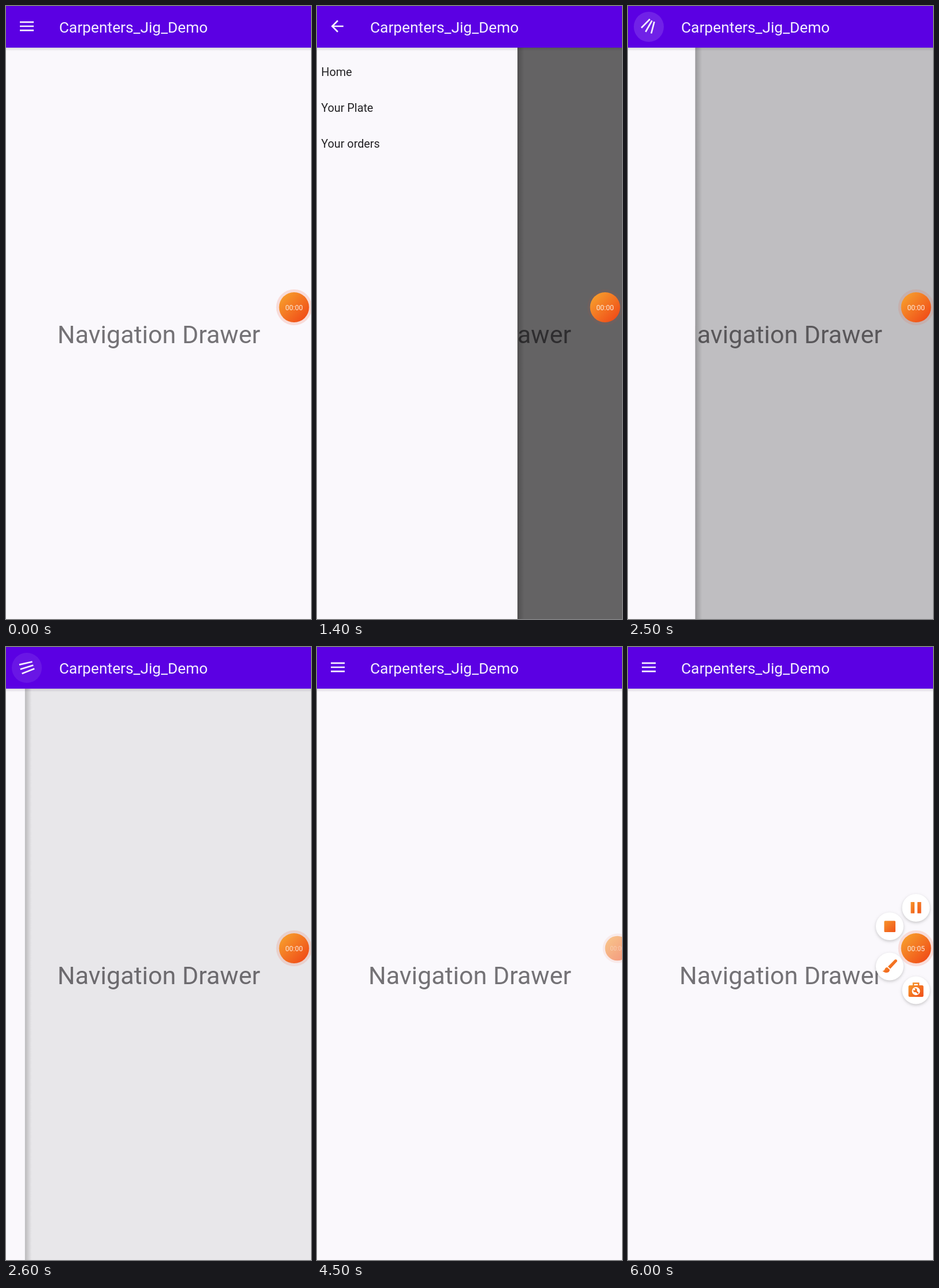
Animation of 528x1060 px, one loop 6100 ms. Source, as an HTML page with a canvas:

```html
<!DOCTYPE html>
<html lang="en">
<head>
<meta charset="utf-8">
<title>Navigation drawer</title>
<style>
  html, body { margin: 0; width: 100%; height: 100%; overflow: hidden; background: #faf8fc; }
  canvas { display: block; }
</style>
</head>
<body>
<canvas id="stage" width="528" height="1060"></canvas>
<script>
const ctx = document.getElementById('stage').getContext('2d');
const W = 528, H = 1060, BAR = 72, DRAWER = 347, LOOP = 6100, STEP = 100;
const DP = 4 / 3;
const PAPER = '#faf8fc';

const clamp = x => Math.max(0, Math.min(1, x));
const lerp = (a, b, p) => a + (b - a) * p;
const span = (t, a, b) => clamp((t - a) / (b - a));
const easeOut = (x, n) => 1 - Math.pow(1 - x, n);
const smooth = x => x * x * (3 - 2 * x);

function text(str, x, y, size, color, align = 'left') {
  ctx.font = `${size}px Roboto, "Noto Sans", sans-serif`;
  ctx.textAlign = align;
  ctx.fillStyle = color;
  ctx.fillText(str, x, y);
}

function disc(x, y, r, fill) {
  ctx.fillStyle = fill;
  ctx.beginPath();
  ctx.arc(x, y, r, 0, Math.PI * 2);
  ctx.fill();
}

function box(x, y, w, h, r = 0) {
  ctx.beginPath();
  ctx.roundRect(x, y, w, h, r);
  ctx.fill();
}

function fade(x0, y0, x1, y1, from, to) {
  const g = ctx.createLinearGradient(x0, y0, x1, y1);
  g.addColorStop(0, from);
  g.addColorStop(1, to);
  return g;
}

const orange = r => fade(-r, -r, r, r, '#f79c2c', '#f04c18');

function at(x, y, scale, draw) {
  ctx.save();
  ctx.translate(x, y);
  ctx.scale(scale, scale);
  draw();
  ctx.restore();
}

// How far the drawer is open; it appears at once and closes with a quintic ease.
function openness(t) {
  if (t < 800) return 0;
  if (t < 2000) return lerp(0.96, 1, span(t, 800, 900));
  return 1 - easeOut(span(t, 2391, 2946), 5);
}

function scrimAlpha(t) {
  return t < 2000 && t >= 800 ? lerp(0.56, 0.6, span(t, 800, 1000)) : 0.6 * openness(t - 15);
}

function drawContent() {
  ctx.fillStyle = PAPER;
  ctx.fillRect(0, 0, W, H);
  text('Navigation Drawer', 264.5, 583, 43, '#747276', 'center');
}

function drawDrawer(t, scrim) {
  const open = openness(t);
  if (open < 0.002) return;
  const edge = t < 2000 ? DRAWER : DRAWER * open;
  ctx.fillStyle = `rgba(0,0,0,${scrim})`;
  ctx.fillRect(0, BAR, W, H - BAR);
  ctx.fillStyle = fade(edge, 0, edge + 12, 0, 'rgba(0,0,0,.2)', 'rgba(0,0,0,0)');
  ctx.fillRect(edge, BAR, 12, H - BAR);
  ctx.fillStyle = PAPER;
  ctx.fillRect(0, BAR, edge, H - BAR);
  ['Home', 'Your Plate', 'Your orders'].forEach((item, i) =>
    text(item, edge - DRAWER + 7.3, 121 + 62 * i, 19.8, '#232225'));
}

function drawRipple(t) {
  const second = t >= 2000;
  const grow = second ? span(t, 2200, 2500) : span(t, 0, 400);
  const gone = second ? span(t, 2500, 2800) : span(t, 850, 1400);
  if (grow <= 0 || gone >= 1) return;
  const r = 26 * easeOut(grow, 2);
  const drift = second ? 1 - grow : 0;
  disc(36 + 3 * drift, 36 - 6 * drift, r, `rgba(255,255,255,${0.13 * (1 - gone)})`);
}

// Three bars that turn into a back arrow as p goes from 0 to 1.
function drawMenuIcon(p, turn) {
  const thick = 2 * DP;
  const cut = thick / 2 * Math.SQRT1_2;
  const size = lerp(18 * DP, 8 * DP * Math.SQRT2, p);
  const shaft = lerp(18 * DP, 16 * DP, p);
  const angle = lerp(0, Math.PI / 4, p);
  const dx = size * Math.cos(angle), dy = size * Math.sin(angle);
  const off = lerp(5.3 * DP, -cut, p);
  const left = -shaft / 2;
  ctx.save();
  ctx.translate(36, 35);
  ctx.rotate(turn * Math.PI * (1 - p));
  ctx.strokeStyle = '#f7f2ff';
  ctx.lineWidth = thick;
  ctx.beginPath();
  ctx.moveTo(left + cut * p, 0);
  ctx.lineTo(-left - cut * p, 0);
  for (const s of [1, -1]) {
    ctx.moveTo(left, s * off);
    ctx.lineTo(left + dx, s * (off + dy));
  }
  ctx.stroke();
  ctx.restore();
}

function drawBar(t) {
  ctx.fillStyle = fade(0, BAR, 0, BAR + 6, 'rgba(0,0,0,.13)', 'rgba(0,0,0,0)');
  ctx.fillRect(0, BAR, W, 6);
  ctx.fillStyle = '#5b00e3';
  ctx.fillRect(0, 0, W, BAR);
  drawRipple(t);
  drawMenuIcon(openness(t), t < 2000 ? -1 : 1);
  text('Carpenters_Jig_Demo', 92, 46, 26.3, '#f5efff');
}

const icons = {
  pause() {
    box(-9, -10, 6.5, 19.5, 0.5);
    box(2.5, -10, 6.5, 19.5, 0.5);
  },
  stop() {
    box(-9.5, -9.5, 19.5, 19.5, 1.5);
  },
  brush() {
    ctx.beginPath();
    ctx.moveTo(-3, 0);
    ctx.lineTo(9, -12);
    ctx.quadraticCurveTo(13, -13, 13, -9);
    ctx.lineTo(1, 4);
    ctx.closePath();
    ctx.fill();
    ctx.beginPath();
    ctx.moveTo(-4, 1.5);
    ctx.bezierCurveTo(-10, 1, -7, 8, -12.5, 7.5);
    ctx.bezierCurveTo(-9, 12, 0, 12, 0, 5.5);
    ctx.closePath();
    ctx.fill();
  },
  toolbox() {
    box(-13, -8.5, 26, 20, 2.5);
    ctx.strokeStyle = ctx.fillStyle;
    ctx.lineWidth = 2.5;
    ctx.strokeRect(-4.5, -12, 9, 5);
    disc(0, 1.5, 7, '#fff');
    disc(-1.5, 0, 3.4, orange(12));
    ctx.strokeStyle = '#f2691f';
    ctx.beginPath();
    ctx.moveTo(-1, 0.5);
    ctx.lineTo(4, 5.5);
    ctx.stroke();
    disc(-3, -1.5, 1.7, '#fff');
  }
};

const menu = [['pause', 0, -70], ['stop', -45.5, -38], ['brush', -45.5, 31.5], ['toolbox', 0, 72.5]];

function drawMenu(t) {
  const p = easeOut(span(t, 5620, 5950), 2);
  if (p <= 0) return;
  for (const [name, dx, dy] of menu) {
    at(498.5 + dx * p, 521 + dy * p, lerp(0.4, 1, p), () => {
      ctx.save();
      ctx.shadowColor = 'rgba(0,0,0,.2)';
      ctx.shadowBlur = 5;
      ctx.shadowOffsetY = 2;
      disc(0, 0, 24, '#fff');
      ctx.restore();
      ctx.fillStyle = orange(12);
      icons[name]();
    });
  }
}

// Floating timer: dims, docks at the screen edge, then comes back.
function drawTimer(t, scrim) {
  const back = span(t, 5300, 5600);
  const dim = span(t, 3100, 3500) * (1 - back);
  const dock = smooth(span(t, 3500, 3850)) * (1 - smooth(back));
  at(lerp(498.7, 520, dock), 521, lerp(1, 0.82, dock), () => {
    ctx.globalAlpha = 1 - 0.49 * dim;
    disc(0, 0, 31, `rgba(232,75,35,${0.16 * (1 - scrim)})`);
    disc(0, 0, 26, orange(20));
    text(t < 5000 ? '00:00' : '00:05', 0, 4.5, 12.2, '#fdeadb', 'center');
  });
}

function render(t) {
  const scrim = scrimAlpha(t);
  drawContent();
  drawDrawer(t, scrim);
  drawBar(t);
  drawMenu(t);
  drawTimer(t, scrim);
}

const start = performance.now();
function tick() {
  const t = (performance.now() - start) % LOOP;
  render(Math.floor(t / STEP) * STEP);
  requestAnimationFrame(tick);
}
tick();
</script>
</body>
</html>
```
